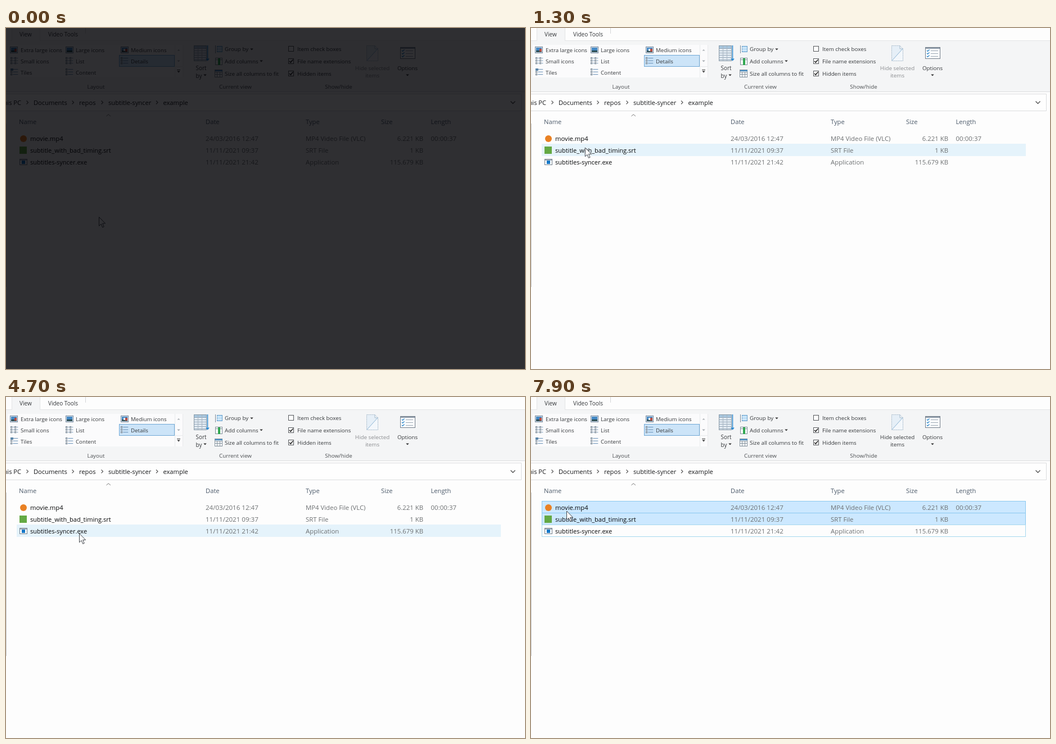
An HTML page for the animation above (8000 ms loop, 923 by 607 pixels).

```html
<!DOCTYPE html>
<html lang="en">
<head>
<meta charset="utf-8">
<title>File list</title>
<style>
  html, body { margin: 0; width: 100%; height: 100%; overflow: hidden; background: #fdfdfd; }
  svg { display: block; width: 923px; height: 607px; }
  text { font-family: "Open Sans", "Noto Sans", sans-serif; white-space: pre; }
</style>
</head>
<body>
<svg id="stage" viewBox="0 0 923 607" xmlns="http://www.w3.org/2000/svg"></svg>
<script>
const NS = 'http://www.w3.org/2000/svg';
const stage = document.getElementById('stage');

function add(tag, attrs, parent = stage) {
  const el = document.createElementNS(NS, tag);
  for (const key in attrs) el.setAttribute(key, attrs[key]);
  parent.appendChild(el);
  return el;
}
const box = (x, y, width, height, fill, stroke) =>
  add('rect', { x, y, width, height, fill, ...(stroke && { stroke }) });
const path = (d, stroke, width = 1, fill = 'none') =>
  add('path', { d, stroke, 'stroke-width': width, fill });
function label(str, x, y, size = 9.7, fill = '#36393c', anchor = 'start') {
  const el = add('text', { x, y, 'font-size': size, fill, 'text-anchor': anchor });
  el.textContent = str;
  return el;
}
const triangle = (x, y, fill = '#333') =>
  path(`M${x - 2.7} ${y - 1.4}h5.4l-2.7 3z`, 'none', 0, fill);

// Ribbon and its tabs
box(0, 0, 923, 607, '#fdfdfd');
box(0, 22, 923, 91, '#f4f5f6');
box(10, 0, 50, 23, '#f4f5f6');
path('M0 22.5H10.5V0M60.5 0V22.5H923', '#e3e4e6');
path('M141.5 0V10', '#d4d5d7');
path('M0 113.5H923', '#dcdddf');
label('View', 24, 15, 10);
label('Video Tools', 75, 15, 10);

// View layouts
box(3, 30, 311, 58, '#fbfbfc');
path('M300.5 30V88M314.5 30V88M300 68.5H314', '#e8eaec');
box(201.5, 48.5, 98, 20, '#cce4f8', '#72a9d6');

function picture(x, y, right) {
  box(x + .5, y + .5, 13, 11, '#dce8f3', '#74869a');
  box(x + 2, y + 2, 10, 5, '#4388c4');
  box(x + 2, y + 7, 10, 3, '#294a51');
  if (right) box(x + 8, y + 4, 4, 5, '#b64d42');
}
function listIcon(x, y, columns) {
  const step = 14 / columns;
  for (let c = 0; c < columns; c++)
    for (let r = 0; r < 3; r++) {
      box(x + c * step + .5, y + r * 4.5 + .5, 2.3, 2.3, '#eef4f8', '#778593');
      path(`M${x + c * step + 4.3} ${y + r * 4.5 + 1.7}h${step - 5}`, '#638cb3');
    }
}
picture(7, 33, true);
picture(106, 33, false);
picture(204, 33, true);
box(209, 37, 3, 4, '#f4f5f6');
listIcon(8, 52, 2);
listIcon(106, 52, 2);
listIcon(204, 52, 1);
listIcon(8, 72, 1);
listIcon(106, 72, 1);
box(8, 72, 5, 4, '#5d87aa');
[
  ['Extra large icons', 26, 42.6], ['Large icons', 124, 42.6], ['Medium icons', 222, 42.6],
  ['Small icons', 26, 62.6], ['List', 124, 62.6], ['Details', 222, 62.6],
  ['Tiles', 26, 82.6], ['Content', 124, 82.6]
].forEach(([str, x, y]) => label(str, x, y));
path('M304.5 40.5h5l-2.5-2.5z', 'none', 0, '#a9adb2');
triangle(307, 59, '#a9adb2');
path('M304 74.5h6', '#444');
triangle(307, 78);

// Current view
box(334.5, 31.5, 22, 27, '#e4ecf3', '#8799a7');
box(335, 32, 21, 4, '#a9c7df');
for (let i = 1; i < 7; i++) path(`M335 ${32 + i * 4}.5h21`, '#93a6b8');
path('M341.5 32v26M348.5 32v26', '#a9b6c2');
path('M358.5 31V57M356 54.5l2.5 3 2.5-3', '#2586d0', 1.5);
label('Sort', 347, 75, 9.9, '#36393c', 'middle');
label('by', 343, 88.5, 9.9, '#36393c', 'middle');
triangle(354, 84);

path('M372.5 31V45', '#7d8c99');
box(375.5, 32.5, 9, 10, '#b9dcf5', '#6da3cd');
path('M375 35.5h9M375 39.5h9', '#e9f5ff');
box(372.5, 53.5, 12, 12, '#fafbfc', '#84919c');
path('M372 56.5h12', '#84919c');
box(377, 54, 4, 12, '#32a852');
box(371.5, 74.5, 13, 13, '#fafbfc', '#84919c');
path('M372 78.5h13M372 82.5h13M375.5 78v9M380.5 78v9', '#84919c');
path('M372 76h13', '#438dc6', 2);
label('Group by', 389, 41.3, 9.8);
triangle(437, 38);
label('Add columns', 389, 63, 9.8);
triangle(454, 59);
label('Size all columns to fit', 389, 85, 9.8);

// Show and hide
function checkBox(str, y, checked) {
  box(502.5, y + .5, 9, 9, '#fff', '#55585c');
  if (checked) path(`M504 ${y + 5}l2.2 2.3 4.2-5`, '#222', 1.5);
  label(str, 518, y + 9, 9.75);
}
checkBox('Item check boxes', 32, false);
checkBox('File name extensions', 54, true);
checkBox('Hidden items', 76, true);

path('M641.5 31.5H656L661.5 37V58.5H641.5Z', '#a5b9ca', 1, '#f3f7fb')
  .setAttribute('stroke-dasharray', '2 1');
path('M642 32H656V37H661L642 58Z', 'none', 0, '#e6eff7');
path('M656 31.5V37H661.5', '#a5b9ca');
path('M642 58L661 37', '#8db5d5');
const hideLabels = [
  label('Hide selected', 651.5, 74.5, 9.8, '#8b8d90', 'middle'),
  label('items', 651.5, 88, 9.8, '#8b8d90', 'middle')
];

box(701.5, 34.5, 26, 20, '#fbfcfd', '#747f8b');
box(702, 35, 25, 2, '#8d9aa8');
for (const y of [40, 45, 50]) {
  path(`M704 ${y}l1.5 1.5 3-3`, '#2785ca', 1.2);
  path(`M711 ${y}.5h13`, '#9ba7b3');
}
label('Options', 714, 74.5, 9.8, '#36393c', 'middle');
triangle(714, 84);

label('Layout', 160, 107.5, 9.8, '#4c4f52', 'middle');
label('Current view', 408, 107.5, 9.8, '#4c4f52', 'middle');
label('Show/hide', 591.5, 107.5, 9.8, '#4c4f52', 'middle');

// Address bar
box(0, 117, 917, 31, '#fefefe');
path('M0 117.5H916.5V147.5H0', '#dcdddf');
label('This PC', 27, 136.5, 11.1, '#17181a', 'end');
[['Documents', 49], ['repos', 130], ['subtitle-syncer', 182], ['example', 279.5]]
  .forEach(([str, x]) => {
    label(str, x, 136.5, 11.15, '#17181a');
    path(`M${x - 12.5} 129.5l3 3-3 3`, '#555', 1.1);
  });
path('M897.5 130.5l4 4 4-4', '#555', 1.4);

// List header
path('M.5 170V461', '#c9cbce');
path('M178.5 157l3.7-3.2 3.7 3.2', '#777');
[['Name', 23], ['Date', 355], ['Type', 533], ['Size', 667], ['Length', 755.5]]
  .forEach(([str, x]) => label(str, x, 171, 11.2, '#4c5a6a'));

// Files
const files = [
  ['movie.mp4', '24/03/2016 12:47', 'MP4 Video File (VLC)', '6.221 KB', '00:00:37'],
  ['subtitle_with_bad_timing.srt', '11/11/2021 09:37', 'SRT File', '1 KB', ''],
  ['subtitles-syncer.exe', '11/11/2021 21:42', 'Application', '115.679 KB', '']
];
const rowTop = i => 186 + i * 21;
const rows = files.map((_, i) => add('rect', {
  x: 19.5, y: rowTop(i) - .5, width: 860, height: 21, fill: 'none', stroke: 'none'
}));
files.forEach(([name, date, type, size, length], i) => {
  const y = rowTop(i) + 15;
  label(name, 43, y, i ? 11 : 11.25, '#08090a');
  label(date, 355, y, 11.55, '#6d7072');
  label(type, 533, y, 11.35, '#6d7072');
  label(size, 742, y, 11.35, '#6d7072', 'end');
  label(length, 755.5, y, 11.5, '#6d7072');
});
add('circle', { cx: 31, cy: 197, r: 6, fill: '#e98124' });
box(24, 211, 13, 13, '#64a944');
box(24.5, 233.5, 13, 10, '#fbfcfd', '#74828f');
path('M25 235h12', '#a8b3be', 2);
box(28, 236, 6, 6, '#1679c8');

const marquee = add('rect', { fill: '#0078d7', 'fill-opacity': .38, stroke: '#1679c8' });
const cursor = path('M.5 0V15.8L4.2 12.4 6.7 18.4 9.2 17.3 6.7 11.4H11.6Z', '#43474d', 1, '#fff');
const shade = box(0, 0, 923, 607, '#010104');

// Pointer stops: time, x, y
const stops = [
  [400, 165, 336.5], [900, 118, 250], [1500, 88, 200], [2300, 92, 197.5],
  [2700, 95, 205], [3000, 104, 219], [3500, 110, 221], [3900, 122, 240],
  [4700, 130, 243], [5400, 124, 240], [6200, 12, 190], [6300, 11, 190],
  [6500, 48, 206], [6900, 70, 223], [7300, 66, 212], [7900, 63, 203]
];
const DRAG_START = 6300, DRAG_END = 7000;
const anchor = { x: 11.5, y: 190.5 };

function pointerAt(t) {
  const next = stops.findIndex(stop => stop[0] > t);
  if (next === 0) return { x: stops[0][1], y: stops[0][2] };
  if (next < 0) {
    const last = stops[stops.length - 1];
    return { x: last[1], y: last[2] };
  }
  const a = stops[next - 1], b = stops[next];
  const p = (t - a[0]) / (b[0] - a[0]);
  const e = p * p * (3 - 2 * p);
  return { x: a[1] + (b[1] - a[1]) * e, y: a[2] + (b[2] - a[2]) * e };
}

function rowStyle(selected, hovered, focused) {
  if (selected) return ['#cce8ff', hovered ? '#8bc8ef' : '#cce8ff'];
  if (hovered) return ['#e5f3fb', '#e5f3fb'];
  return ['none', focused ? '#a6d8ee' : 'none'];
}

function render(t) {
  const tip = pointerAt(t);
  const dragging = t >= DRAG_START && t < DRAG_END;
  const released = t >= DRAG_END;
  const started = t > DRAG_START;
  cursor.setAttribute('transform', `translate(${tip.x} ${tip.y})`);

  marquee.setAttribute('visibility', dragging && started ? 'visible' : 'hidden');
  marquee.setAttribute('x', anchor.x);
  marquee.setAttribute('y', anchor.y);
  marquee.setAttribute('width', Math.max(0, tip.x - 2.5 - anchor.x));
  marquee.setAttribute('height', Math.max(0, tip.y - anchor.y));

  rows.forEach((row, i) => {
    const over = tip.x > 19 && tip.y >= rowTop(i) && tip.y < rowTop(i + 1);
    const selected = i < 2 && (released ||
      dragging && started && tip.x > 22 && tip.y > rowTop(i));
    const hovered = released ? i < 2 : over && !dragging;
    const [fill, stroke] = rowStyle(selected, hovered, i === 2 && started);
    row.setAttribute('fill', fill);
    row.setAttribute('stroke', stroke);
  });
  hideLabels.forEach(el => el.setAttribute('fill', started ? '#36393c' : '#8b8d90'));
  shade.setAttribute('opacity', Math.max(0, .81 - t / 100 * .21));
}

const LOOP = 8000, STEP = 100;
let start;
function tick(now) {
  start ??= now;
  render(Math.floor((now - start) % LOOP / STEP) * STEP);
  requestAnimationFrame(tick);
}
render(0);
requestAnimationFrame(tick);
</script>
</body>
</html>
```
